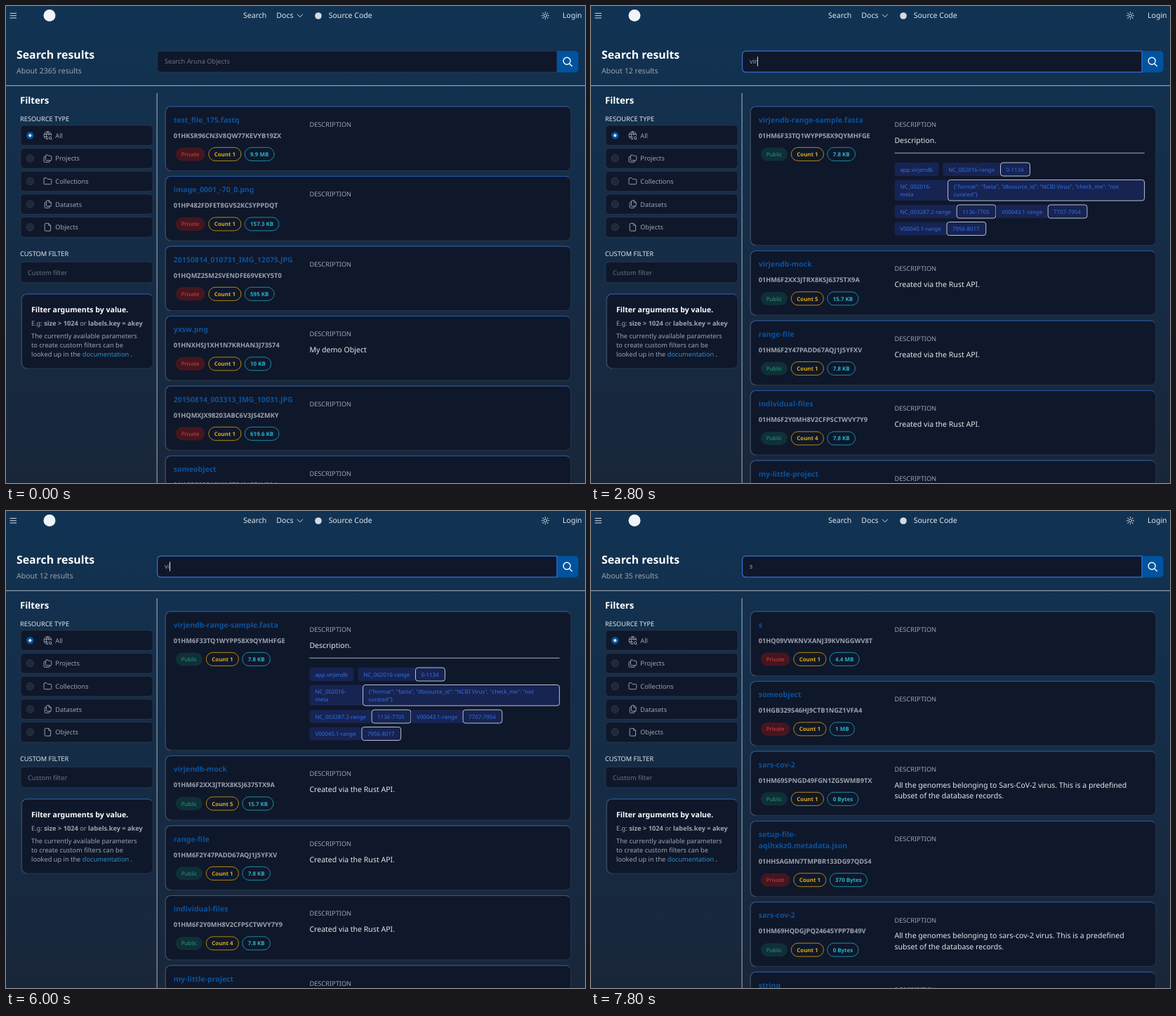
These frames come from a looping animation (825 by 679 pixels, 8000 ms). An HTML page:

```html
<!DOCTYPE html>
<html lang="en">
<head>
<meta charset="utf-8">
<title>Search results</title>
<style>
  html, body { margin: 0; width: 100%; height: 100%; overflow: hidden; background: #19263a; }
  svg { display: block; width: 825px; height: 679px; font-family: "Noto Sans", sans-serif; text-rendering: geometricPrecision; }
  text { white-space: pre; }
  .xs { font-size: 7.92px; }
  .sm { font-size: 9.24px; }
  .md { font-size: 10.56px; }
  .xl { font-size: 13.2px; }
  .xxl { font-size: 15.84px; }
  .bold { font-weight: 700; }
  .medium { font-weight: 500; }
  .white { fill: #fff; }
  .light { fill: #e2e6ec; }
  .grey { fill: #9ca3af; }
  .dim { fill: #6b7280; }
  .title { fill: #0b529b; }
  .link { fill: #2f8fcb; }
  .box { fill: #0f172a; stroke: #303c50; stroke-width: .8; }
  .edge { fill: none; stroke: #37445a; stroke-width: 1.6; }
  .top { fill: none; stroke: #2a5aa6; stroke-width: 1; }
  .rule { stroke: #b9c3cf; stroke-width: .9; }
  .icon { fill: none; stroke: #9ca3af; stroke-width: 1.6; stroke-linecap: round; stroke-linejoin: round; }
  .line { fill: none; stroke: #d5dae1; stroke-width: 1; stroke-linecap: round; stroke-linejoin: round; }
  .radio { fill: #1f2937; stroke: #364152; stroke-width: .7; }
  .brand { fill: #00549f; }
  .private { fill: #45161f; }
  .private + text { fill: #d63f40; }
  .public { fill: #102f36; }
  .public + text { fill: #229b83; }
  .count { fill: none; stroke: #c4930f; stroke-width: .9; }
  .count + text { fill: #e2ab10; }
  .size { fill: none; stroke: #1a99b2; stroke-width: .9; }
  .size + text { fill: #22b4d0; }
  .key { fill: #172351; }
  .value { fill: #172351; stroke: #cbd5e1; stroke-width: .9; }
  .tag { fill: #3272e6; }
  .results { visibility: hidden; }
  .results.on { visibility: visible; }
  .focus { stroke: #3b6fce; stroke-width: 1.2; }
</style>
</head>
<body>
<svg id="stage" viewBox="0 0 825 679">
  <defs>
    <linearGradient id="sky" x2="0" y2="1">
      <stop stop-color="#113353"/>
      <stop offset="1" stop-color="#19263a"/>
    </linearGradient>
  </defs>
  <rect width="825" height="679" fill="url(#sky)"/>
</svg>
<script>
const stage = document.getElementById('stage');

function add(parent, tag, attrs = {}, content) {
  const node = document.createElementNS('http://www.w3.org/2000/svg', tag);
  for (const name in attrs) node.setAttribute(name, attrs[name]);
  if (content !== undefined) node.textContent = content;
  return parent.appendChild(node);
}
const text = (g, x, y, cls, str) => add(g, 'text', { x, y, class: cls }, str);
const lines = (g, x, y, step, cls, str) =>
  str.split('|').forEach((s, i) => text(g, x, y + i * step, cls, s));
const rect = (g, x, y, width, height, rx, cls) =>
  add(g, 'rect', { x, y, width, height, rx, class: cls });
const path = (g, d, cls, more) => add(g, 'path', { d, class: cls, ...more });
const circle = (g, cx, cy, r, more) => add(g, 'circle', { cx, cy, r, ...more });

function panel(g, x, y, w, h) {
  const r = 7.5;
  rect(g, x, y, w, h, r, 'box');
  path(g, `M${x + r} ${y + h}a${r} ${r} 0 0 1 ${-r} ${-r}V${y + r}a${r} ${r} 0 0 1 ${r / 2} ${-r * .86}`, 'edge');
  path(g, `M${x + 2} ${y + 2.4}q2 -2.4 ${r - 2} -2.4H${x + w - r}q3.5 0 5.5 2.4`, 'top');
}

// Page header
function drawHeader() {
  path(stage, 'M6 10.4h8.6M6 13.7h8.6M6 17h8.6', 'line');
  circle(stage, 62, 13.5, 8.5, { fill: '#eef4f9' });
  text(stage, 338, 17.4, 'md light', 'Search');
  text(stage, 385.3, 17.4, 'md light', 'Docs');
  path(stage, 'M415.2 12l3.7 3.7l3.7 -3.7', 'line');
  circle(stage, 445, 14, 4.8, { fill: '#d5dae1' });
  text(stage, 459.7, 17.4, 'md light', 'Source Code');
  circle(stage, 768.4, 13.7, 2.1, { class: 'line' });
  for (let a = 0; a < 360; a += 45)
    path(stage, 'M768.4 9.8v-1.3', 'line', { transform: `rotate(${a} 768.4 13.7)` });
  text(stage, 793, 17.4, 'md light', 'Login');

  text(stage, 15, 74.6, 'xxl bold white', 'Search results');
  path(stage, 'M0 113.4H825M215.1 124V679', 'rule');
  path(stage, 'M785 64h25.5a5 5 0 0 1 5 5v20.4a5 5 0 0 1 -5 5h-25.5z', 'brand');
  path(stage, 'M803 82.2l3.4 3.4', 'line', { style: 'stroke:#fff;stroke-width:1.4' });
  circle(stage, 799.2, 78.2, 5, { class: 'line', style: 'stroke:#fff;stroke-width:1.4' });
}

// Filter column
const file = 'h4l5 5v';
const kinds = [
  ['All', 'M21 12a9 9 0 1 0 -9 9M3.6 9h16.8M3.6 15h7.9M11.5 3a17 17 0 0 0 0 18M12.5 3a17 17 0 0 1 2.6 8.6M15 18a3 3 0 1 0 6 0a3 3 0 1 0 -6 0M20.2 20.2l1.8 1.8'],
  ['Projects', 'M9 4h3l2 2h5a2 2 0 0 1 2 2v7a2 2 0 0 1 -2 2h-10a2 2 0 0 1 -2 -2v-9a2 2 0 0 1 2 -2M17 17v2a2 2 0 0 1 -2 2h-10a2 2 0 0 1 -2 -2v-9a2 2 0 0 1 2 -2h2'],
  ['Collections', 'M5 4h4l3 3h7a2 2 0 0 1 2 2v8a2 2 0 0 1 -2 2h-14a2 2 0 0 1 -2 -2v-11a2 2 0 0 1 2 -2'],
  ['Datasets', `M15 3v4a1 1 0 0 0 1 1h4M18 17h-7a2 2 0 0 1 -2 -2v-10a2 2 0 0 1 2 -2${file}7a2 2 0 0 1 -2 2zM16 17v2a2 2 0 0 1 -2 2h-7a2 2 0 0 1 -2 -2v-10a2 2 0 0 1 2 -2h2`],
  ['Objects', `M14 3v4a1 1 0 0 0 1 1h4M17 21h-10a2 2 0 0 1 -2 -2v-14a2 2 0 0 1 2 -2h3${file}11a2 2 0 0 1 -2 2z`]
];

function drawFilters() {
  text(stage, 20, 138.7, 'xl bold white', 'Filters');
  text(stage, 20, 163.5, 'sm light', 'RESOURCE TYPE');
  kinds.forEach(([label, icon], i) => {
    const y = 184.2 + i * 32.65;
    rect(stage, 20.8, y - 14.4, 188.4, 28.8, 5, 'box');
    circle(stage, 34.3, y, 5.2, { class: i ? 'radio' : 'brand' });
    if (!i) circle(stage, 34.3, y, 2, { class: 'white' });
    path(stage, icon, 'icon', { transform: `translate(52.2 ${y - 7.2}) scale(.6)` });
    text(stage, 70.3, y + 3.4, 'sm grey', label);
  });
  text(stage, 20, 355.6, 'sm light', 'CUSTOM FILTER');
  rect(stage, 20.8, 364.3, 188.4, 29.6, 5, 'box');
  text(stage, 31, 382.5, 'sm dim', 'Custom filter');

  panel(stage, 22.3, 410, 187, 106);
  text(stage, 36, 435.5, 'md bold white', 'Filter arguments by value.');
  const hint = text(stage, 36, 454.6, 'sm grey', 'E.g: ');
  add(hint, 'tspan', { class: 'bold' }, 'size > 1024');
  add(hint, 'tspan', {}, ' or ');
  add(hint, 'tspan', { class: 'bold' }, 'labels.key = akey');
  lines(stage, 36, 473, 13.2, 'sm grey', 'The currently available parameters|to create custom filters can be');
  const last = text(stage, 36, 499.4, 'sm grey', 'looked up in the ');
  add(last, 'tspan', { class: 'link' }, 'documentation');
  add(last, 'tspan', {}, ' .');
}

// Result cards
const origin = '{"format": "fasta", "dbsource_id": "NCBI Virus", "check_me": "not';
const app = ['key', 432.5, 80, 63, 'app.virjendb'];
const metaTags = [app, ['key', 432.5, 104.5, 36, 'meta'], ['value', 468.2, 104.5, 294, origin + ' curated"}']];
const rangeTags = [
  app,
  ['key', 501.3, 80, 83, 'NC_002016-range'], ['value', 583.5, 80, 42, '0-1134'],
  ['key', 432.5, 104.5, 77, 'NC_002016-|meta'], ['value', 508.6, 104.5, 280, origin + '|curated"}'],
  ['key', 432.5, 140, 89, 'NC_003287.2-range'], ['value', 521.2, 140, 55.7, '1136-7705'],
  ['key', 577, 140, 75, 'V00043.1-range'], ['value', 651.2, 140, 55.7, '7707-7954'],
  ['key', 432.5, 164.5, 75, 'V00045.1-range'], ['value', 507, 164.5, 55.7, '7956-8017']
];

const card = (access, name, id, count, size, about = '', tags) => ({ access, name, id, count, size, about, tags });
const priv = (name, id, size, about) => card('Private', name, id, 1, size, about);
const pub = (...rest) => card('Public', ...rest);

const rust = 'Created via the Rust API.';
const genomes = virus => `All the genomes belonging to ${virus} virus. This is a predefined|subset of the database records.`;
const range = pub('virjendb-range-sample.fasta', '01HM6F33TQ1WYPP58X9QYMHFGE', 1, '7.8 KB', 'Description.', rangeTags);
const mock = pub('virjendb-mock', '01HM6F2XX3JTRX8KSJ6375TX9A', 5, '15.7 KB', rust);
const sarsA = pub('sars-cov-2', '01HM69SPNGD49FGN1ZG5WMB9TX', 1, '0 Bytes', genomes('Sars-CoV-2'));
const sarsB = pub('sars-cov-2', '01HM69HQDGJPQ24645YPP7B49V', 1, '0 Bytes', genomes('sars-cov-2'));
const some = priv('someobject', '01HGB329S46HJ9CTB1NGZ1VFA4', '1 MB');

const results = {
  all: { total: 2365, cards: [
    priv('test_file_175.fastq', '01HKSR96CN3V8QW77KEVYB19ZX', '9.9 MB'),
    priv('image_0001_-70_0.png', '01HP482FDFET8GV52KCSYPPDQT', '157.3 KB'),
    priv('20150814_010731_IMG_12075.JPG', '01HQMZ25M2SVENDFE69VEKY5T0', '595 KB'),
    priv('yxsw.png', '01HNXHSJ1XH1N7KRHAN3J73574', '10 KB', 'My demo Object'),
    priv('20150814_003313_IMG_10031.JPG', '01HQMXJX98203ABC6V3JS4ZMKY', '619.6 KB'),
    some
  ] },
  v: { total: 17, cards: [
    pub('V00043.fasta', '01HM6F33CZ45EHFWQ613RNPHNE', 1, '248 Bytes', 'Description.', metaTags),
    range,
    pub('V00045.fasta', '01HM6F33M5EBZRT8Y12Q98N8M6', 1, '62 Bytes', 'Description.', metaTags),
    mock
  ] },
  vi: { total: 12, cards: [
    range, mock,
    pub('range-file', '01HM6F2Y47PADD67AQJ1J5YFXV', 1, '7.8 KB', rust),
    pub('individual-files', '01HM6F2Y0MH8V2CFPSCTWVY7Y9', 4, '7.8 KB', rust),
    pub('my-little-project', '', 1, '7.8 KB', rust)
  ] },
  vir: { total: 9, cards: [range, mock, sarsA, sarsB, pub('mock-test', '', 1, '7.8 KB', rust)] },
  s: { total: 35, cards: [
    priv('s', '01HQ09VWKNVXANJ39KVNGGWV8T', '4.4 MB'),
    some, sarsA,
    priv('setup-file-|aqihxkz0.metadata.json', '01HHSAGMN7TMPBR133DG97QDS4', '370 Bytes'),
    sarsB,
    priv('string', '', '1 MB')
  ] }
};

function pill(g, x, y, cls, weight, label) {
  const box = rect(g, x, y, 0, 19, 9.5, cls);
  const width = text(g, x + 7.9, y + 12.6, 'xs ' + weight, label).getComputedTextLength() + 15.8;
  box.setAttribute('width', width);
  return x + width + 5.3;
}

function drawCard(g, y, c) {
  const wrap = c.name.includes('|') ? 15.84 : 0;
  const height = c.tags === rangeTags ? 197.6 : c.tags ? 136.9 : 91.56 + wrap;
  panel(g, 227.2, y, 577.6, height);
  lines(g, 238.7, y + 22.7, 15.84, 'md bold title', c.name);
  text(g, 238.7, y + wrap + 44.7, 'sm bold grey', c.id);
  const row = y + wrap + 58.4;
  let x = pill(g, 241.8, row, c.access.toLowerCase(), 'medium', c.access);
  x = pill(g, x, row, 'count', 'bold', 'Count ' + c.count);
  pill(g, x, row, 'size', 'bold', c.size);

  text(g, 432.4, y + 28.9, 'sm grey', 'DESCRIPTION');
  lines(g, 432.4, y + 51.6, 15.84, 'md light', c.about);
  if (c.tags) path(g, `M432.5 ${y + 66.3}H788.7`, 'rule');
  for (const [cls, tx, dy, w, label] of c.tags || []) {
    rect(g, tx, y + dy, w, label.includes('|') ? 29.6 : 19, 3.5, cls);
    lines(g, tx + 7.9, y + dy + 12.7, 10.56, 'xs medium tag', label);
  }
  return y + height + 7.92;
}

drawHeader();
drawFilters();
for (const key in results) {
  const set = results[key];
  set.group = add(stage, 'g', { class: 'results' });
  set.cards.reduce((y, c) => drawCard(set.group, y, c), 143);
}

// Search field and pointer
const total = text(stage, 15, 96.2, 'md grey', '');
const field = path(stage, 'M785 64.2H220.6a5 5 0 0 0 -5 5v20a5 5 0 0 0 5 5H785z', 'box');
const query = text(stage, 226, 82.4, 'sm', '');
const caret = add(stage, 'rect', { y: 72.3, width: 1, height: 13.4, fill: '#e5e7eb' });
const arrow = path(stage, 'M0 0v9.5l2.3 -2l1.5 3.3l1.5 -.7l-1.5 -3.2h3z', '', { fill: '#111', stroke: '#fff', 'stroke-width': .7 });
const beam = path(stage, 'M-1.5 -5.5h3M0 -5.5v11M-1.5 5.5h3', '', { fill: 'none', stroke: '#e5e7eb', 'stroke-width': .9 });

// [start, query, results, caret shown]
const steps = [
  [0, '', 'all', 0],
  [1500, '', 'all', 1],
  [2500, 'v', 'all', 1],
  [2800, 'vir', 'vi', 1],
  [3100, 'vir', 'vir', 1],
  [4200, 'vir', 'vir', 0],
  [5400, 'vir', 'vir', 1],
  [6000, 'vi', 'vi', 1],
  [6200, 'v', 'v', 1],
  [6400, '', 'all', 1],
  [6600, '', 'all', 0],
  [7800, 's', 's', 0]
];
let shown;

function showStep(step) {
  if (step === shown) return;
  shown = step;
  const [start, typed, key, blink] = step;
  for (const k in results) results[k].group.classList.toggle('on', k === key);
  total.textContent = `About ${results[key].total} results`;
  field.setAttribute('class', start ? 'box focus' : 'box');
  query.textContent = typed || 'Search Aruna Objects';
  query.setAttribute('class', typed ? 'sm grey' : 'sm dim');
  caret.setAttribute('x', 226 + (typed ? query.getComputedTextLength() : -.5));
  caret.style.opacity = blink;
}

function movePointer(t) {
  const p = Math.min(6, Math.floor((t - 600) / 100)) / 6;
  const ease = 1 - (1 - p) ** 2;
  const x = 257 + 20.5 * ease, y = 4 + 78.5 * ease;
  const active = t >= 600 && t < 2500, typing = y > 64;
  arrow.style.opacity = active && !typing ? 1 : 0;
  beam.style.opacity = active && typing ? 1 : 0;
  for (const shape of [arrow, beam]) shape.setAttribute('transform', `translate(${x} ${y})`);
}

const begin = performance.now();
function tick() {
  const t = (performance.now() - begin) % 8000;
  showStep(steps.findLast(s => s[0] <= t));
  movePointer(t);
  requestAnimationFrame(tick);
}
tick();
</script>
</body>
</html>
```
